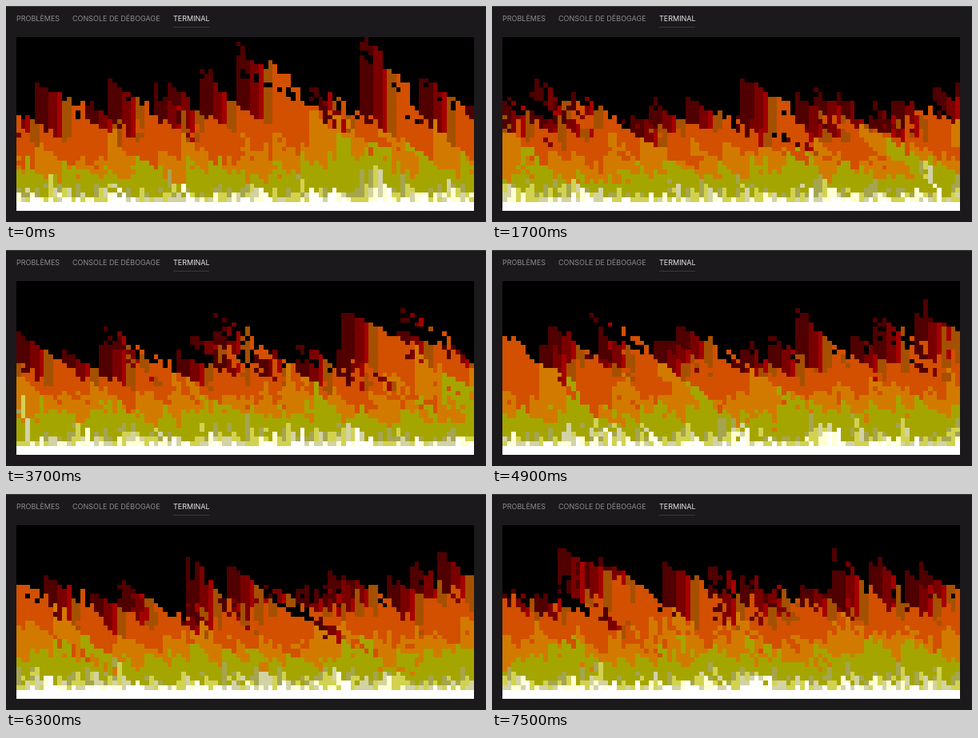
Write an HTML page with a canvas that moves like this. It is 600 px wide and 271 px high and loops after 7600 ms.

```html
<!DOCTYPE html>
<html lang="fr">
<head>
<meta charset="utf-8">
<title>Terminal</title>
<style>
html, body { margin: 0; width: 100%; height: 100%; overflow: hidden; background: #1b191c; }
svg, canvas { position: absolute; left: 0; top: 0; }
text { font: 9px Inter, "Liberation Sans", sans-serif; fill: #8b8a8c; }
.active { fill: #e4e4e4; }
</style>
</head>
<body>
<canvas id="stage" width="600" height="271"></canvas>
<svg width="600" height="271">
  <rect width="600" height="1" fill="#39383b"/>
  <text x="13" y="19">PROBLÈMES</text>
  <text x="83" y="19">CONSOLE DE DÉBOGAGE</text>
  <text x="209" y="19" class="active">TERMINAL</text>
  <rect x="209" y="26" width="45" height="1" fill="#39383b"/>
</svg>
<script>
const COLS = 100, ROWS = 38, FRAMES = 76, FRAME_MS = 100;
const LEFT = 13, TOP = 39, WIDTH = 572, HEIGHT = 218;
const CELL_W = WIDTH / COLS, CELL_H = HEIGHT / ROWS;
const SOURCE = (ROWS - 2) * COLS; // the two lowest rows always burn

// Terminal colours with the number of heat levels each one covers.
const palette = [
  ['#000000', 3], ['#500000', 3], ['#7a0000', 2], ['#a50000', 1],
  ['#a55000', 2], ['#d25000', 8], ['#d27a00', 6], ['#a5a500', 7],
  ['#a5a550', 1], ['#d2d250', 1], ['#d2d2a5', 1], ['#ffffd2', 1], ['#ffffff', 1]
].flatMap(([color, count]) => Array(count).fill(color));
const HOTTEST = palette.length - 1;

let seed = 20;
function random() {
  seed = (seed + 0x6D2B79F5) | 0;
  let t = Math.imul(seed ^ (seed >>> 15), 1 | seed);
  t = (t + Math.imul(t ^ (t >>> 7), 61 | t)) ^ t;
  return ((t ^ (t >>> 14)) >>> 0) / 4294967296;
}

// From the bottom up, each cell takes the heat of a cell below and to its
// right, and loses as much heat as the wind has carried it left.
function burn() {
  const heat = new Uint8Array(COLS * ROWS).fill(HOTTEST, SOURCE);
  for (let i = SOURCE - 1; i >= 0; i--) {
    const decay = Math.floor(4 * random());
    heat[i] = Math.max(0, heat[i + COLS + decay] - decay);
  }
  return heat;
}

const frames = Array.from({ length: FRAMES }, burn);

const ctx = document.getElementById('stage').getContext('2d');
const edgeX = x => Math.round(LEFT + x * CELL_W);
const edgeY = y => Math.round(TOP + y * CELL_H);

function draw(heat) {
  heat.forEach((level, i) => {
    const x = i % COLS, y = Math.floor(i / COLS);
    ctx.fillStyle = palette[level];
    ctx.fillRect(edgeX(x), edgeY(y), edgeX(x + 1) - edgeX(x), edgeY(y + 1) - edgeY(y));
  });
}

let shown = -1;
function tick() {
  const frame = Math.floor(performance.now() / FRAME_MS) % FRAMES;
  if (frame !== shown) draw(frames[shown = frame]);
  requestAnimationFrame(tick);
}
tick();
</script>
</body>
</html>
```
